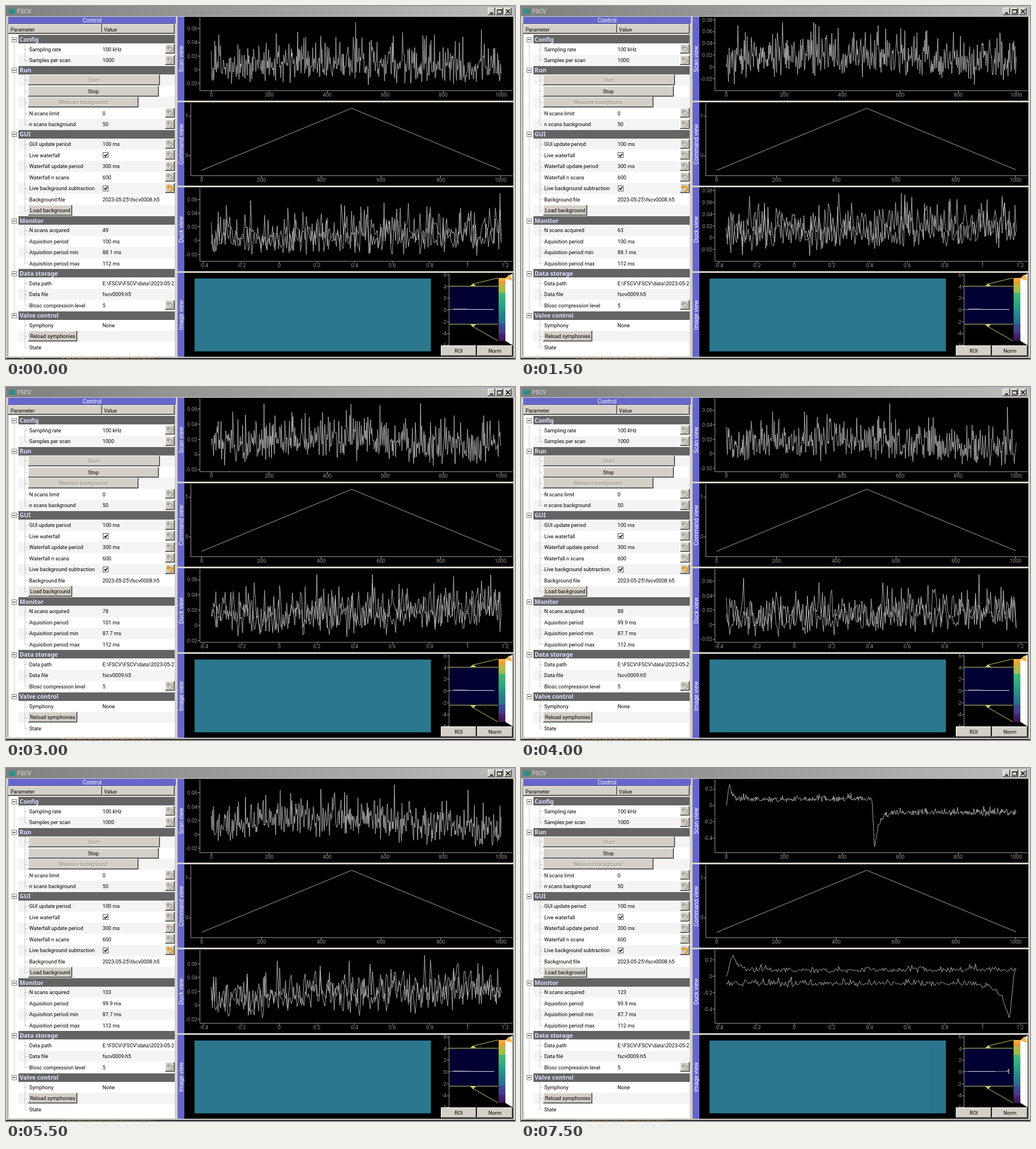
Animation of 899x623 px, one loop 8 s. Source, as an HTML page:

```html
<!DOCTYPE html>
<html lang="en">
<head>
<meta charset="utf-8">
<title>FSCV</title>
<style>
html, body { margin: 0; width: 100%; height: 100%; overflow: hidden; background: #d4d0c8; }
svg { display: block; width: 899px; height: 623px; }
text { font: 9.2px Roboto, "Liberation Sans", sans-serif; white-space: pre; }
.group { font: bold 10.5px "Noto Sans", "Open Sans", sans-serif; fill: #dcdcff; }
.dock { font-size: 10.4px; fill: #fff; text-anchor: middle; }
.axis { fill: #969696; }
.trace { fill: none; stroke: #c4c4c4; stroke-width: .85; stroke-linejoin: bevel; }
</style>
</head>
<body>
<svg id="stage" viewBox="0 0 899 623" xmlns="http://www.w3.org/2000/svg"></svg>
<script>
const FACE = '#d4d0c8', GREY = '#969696';
const STEP_MS = 500, STEPS = 16, KNOTS = 500;

// Low and high value of the scan shown in each step
const RANGES = [
  [-.0219, .069], [-.021, .0695], [-.024, .076], [-.0303, .0755],
  [-.025, .0735], [-.022, .076], [-.0149, .0672], [-.019, .071],
  [-.0164, .0695], [-.02, .071], [-.018, .0755], [-.0176, .0722],
  [-.019, .0715], [-.095, .0139], [-.52, .245], [-.505, .256]
];

const crisp = v => Math.floor(v) + .5;
const rect = (x, y, w, h, fill, extra = '') =>
  `<rect x="${x}" y="${y}" width="${w}" height="${h}" fill="${fill}" ${extra}/>`;
const path = (d, stroke, extra = '') =>
  `<path d="${d}" fill="none" stroke="${stroke}" ${extra}/>`;
const shape = (points, fill) => `<polygon points="${points}" fill="${fill}"/>`;
const text = (x, cy, s, extra = '') => `<text x="${x}" y="${cy + 3.3}" ${extra}>${s}</text>`;
const middle = 'text-anchor="middle"';

function bevel(x, y, w, h) {
  return rect(x, y, w, h, FACE)
    + path(`M${x + .5} ${y + h - 1}V${y + .5}H${x + w - 1}`, '#fff')
    + path(`M${x + 1} ${y + h - 1.5}H${x + w - 1.5}V${y + 1}`, '#808080')
    + path(`M${x} ${y + h - .5}H${x + w - .5}V${y}`, '#404040');
}

function button(x, y, w, h, label, disabled) {
  const cx = x + w / 2, cy = y + h / 2;
  return bevel(x, y, w, h)
    + (disabled ? text(cx + .8, cy + .8, label, middle + ' fill="#fff"') : '')
    + text(cx, cy, label, middle + (disabled ? ' fill="#848078"' : ''));
}

function titleBar() {
  const glyphs = [
    path('M855 12.5H860', '#000', 'stroke-width="2"'),
    path('M867.5 6.5H875.5V13H867.5ZM867 7H876', '#000'),
    path('M883 6L890 13M890 6L883 13', '#000', 'stroke-width="1.5"')
  ];
  return rect(0, 0, 899, 18, 'url(#title)')
    + rect(5, 5, 11, 9, '#2f8c86')
    + text(20, 10, 'FSCV', `fill="${FACE}" style="font-size:10px;font-weight:500"`)
    + [851, 865, 880].map((x, i) => bevel(x, 3, 13, 13) + glyphs[i]).join('');
}

// Rows: [centre y, label, value, revert icon]
const GROUPS = [
  [59, 'Config', [[76.5, 'Sampling rate', '100 kHz', 1], [96, 'Samples per scan', '1000', 1]]],
  [113.5, 'Run', [[130.5], [150], [170], [189.5, 'N scans limit', '0', 1], [209, 'n scans background', '50', 1]]],
  [226.5, 'GUI', [
    [244, 'GUI update period', '100 ms', 1], [263.5, 'Live waterfall', '', 1],
    [283, 'Waterfall update period', '300 ms', 1], [302.5, 'Waterfall n scans', '600', 1],
    [322, 'Live background subtraction', '', 2],
    [341.5, 'Background file', String.raw`2023-05-25\fscv0008.h5`], [361]]],
  [379, 'Monitor', [
    [396, 'N scans acquired', '<tspan id="count"/>'], [415.5, 'Aquisition period', '<tspan id="period"/>'],
    [435, 'Aquisition period min', '<tspan id="least"/>'], [454.5, 'Aquisition period max', '112 ms']]],
  [472, 'Data storage', [
    [489.5, 'Data path', String.raw`E:\FSCV\FSCV\data\2023-05-25`],
    [509, 'Data file', 'fscv0009.h5'], [528.5, 'Blosc compression level', '5', 1]]],
  [546.5, 'Valve control', [[563.5, 'Symphony', 'None'], [583], [602.5, 'State', '']]]
];

function revert(cy, kind) {
  const y = Math.floor(cy);
  const ink = kind === 2 ? '#e39a22' : '#aaa69e';
  return bevel(281, y - 9, 17, 17)
    + path(`M286 ${y - 3}H290.5Q294.5 ${y - 2.5} 294 ${y + 1}Q293 ${y + 4} 289 ${y + 4.5}`, ink, `stroke-width="${kind + 1}"`)
    + shape(`283,${y - 2.5} 288,${y - 7} 288,${y + 2}`, ink);
}

function checkbox(cy) {
  return rect(171.5, crisp(cy) - 5, 9, 9, '#fff', 'stroke="#555"')
    + path(`M173.5 ${cy - .5}L175.5 ${cy + 2}L179 ${cy - 2.5}`, '#000', 'stroke-width="1.7"');
}

function tree() {
  let out = rect(4, 50, 294, 568, '#fff'), index = 0;
  const dots = 'stroke-dasharray="1 1"';
  out += path('M14.5 59V546', '#999', dots);
  for (const [gy, name, rows] of GROUPS) {
    index++;
    out += rect(22, Math.floor(gy - 7.5), 276, 15, '#646464')
      + `<text class="group" x="24" y="${gy + 3.8}">${name}</text>`;
    for (const [cy, label, value, icon] of rows) {
      if (index++ % 2 === 0) out += rect(22, cy - 9.7, 276, 19.4, '#f4f4f4');
      out += path(`M33 ${crisp(cy)}H39`, '#999', dots);
      if (label) out += text(41, cy, label) + text(170.5, cy, value, 'clip-path="url(#tree)"');
      if (label && label.startsWith('Live')) out += checkbox(cy);
      if (icon) out += revert(cy, icon);
    }
    out += path(`M33.5 ${gy + 8}V${rows[rows.length - 1][0]}`, '#999', dots)
      + rect(10.5, crisp(gy) - 4, 8, 8, '#fff', 'stroke="#808080"')
      + path(`M12 ${crisp(gy)}H17`, '#000');
  }
  return out
    + button(39, 121, 233, 19, 'Start', true) + button(39, 141, 231, 19, 'Stop')
    + button(39, 160, 195, 19, 'Measure background', true)
    + button(39, 351, 78, 19, 'Load background') + button(39, 573, 87, 19, 'Reload symphonies');
}

function controlPanel() {
  return rect(4, 19, 296, 12, '#6666cc') + `<text class="dock" x="152" y="28.8">Control</text>`
    + bevel(4, 32, 166, 17) + bevel(170, 32, 128, 17)
    + path('M3.5 618V31.5H298', '#707070')
    + text(8, 41.5, 'Parameter') + text(173, 41.5, 'Value') + tree();
}

function dock(y, h, name) {
  return rect(303, y, 12, h, '#6666cc') + rect(315, y, 581, h, '#000')
    + `<text class="dock" transform="translate(313 ${y + h / 2 + .5}) rotate(-90)">${name}</text>`;
}

function xAxis(left, top, y, x0, dx, labels) {
  return path(`M${left} ${top}V${y}H895`, GREY)
    + labels.map((s, i) => {
      const x = x0 + i * dx;
      return path(`M${crisp(x)} ${y}v4`, GREY) + text(x, y + 7.3, s, middle + ' class="axis"');
    }).join('');
}

const yTick = (axisX, y, s) =>
  path(`M${axisX - 4} ${crisp(y)}h4`, GREY) + text(axisX - 4.5, y, s, 'text-anchor="end" class="axis"');

function plots() {
  const thousand = [0, 200, 400, 600, 800, 1000];
  return dock(19, 148, 'Scan view') + dock(170, 147, 'Command view') + dock(320, 148, 'Duck view')
    + xAxis(342.5, 20, 149.5, 362.5, 102.4, thousand)
    + xAxis(326.5, 171, 299.5, 345.5, 105.6, thousand)
    + xAxis(342.5, 321, 450.5, 349.5, 66.5, [-.4, -.2, 0, .2, .4, .6, .8, 1, 1.2])
    + yTick(326.5, 194, '1') + yTick(326.5, 264, '0')
    + '<path class="trace" d="M345.5 290L610.5 180.5L874 289"/>'
    + '<g id="ticks"/><path id="scan" class="trace"/><path id="duck" class="trace"/>';
}

function imageView() {
  const yellow = '#c8c864';
  return dock(471, 148, 'Image view')
    + rect(333, 481, 417.5, 128.5, '#2a778e')
    + `<g id="stripes">${[722, 728, 734, 741].map(x => rect(x, 481, 2, 128, '#123c60', 'opacity=".1"')).join('')}</g>`
    + rect(783, 494, 86, 68, '#000032')
    + path('M782.5 473V599', GREY)
    + [6, 4, 2, 0, -2, -4, -6].map((v, i) => yTick(782.5, 474.5 + i * 20.7, v)).join('')
    + path('M783 494.5H869M783 561.5H869M825 490.5L869 480M825 566L869 591', yellow)
    + shape('820,494 825,489.5 830,494', yellow) + shape('820,562 825,567 830,562', yellow)
    + path('M783 535.5H862', '#8f8f9c') + '<path id="histogram" fill="none" stroke="#e4e4ec"/>'
    + rect(870, 480, 12, 111, 'url(#colours)')
    + shape('882,480 895,472 895,599 882,591', '#fff')
    + shape('882,481 889,473.5 895,485', '#ffb044')
    + button(768, 599, 63, 19, 'ROI') + button(832, 599, 63, 19, 'Norm');
}

const stops = list => list.map(([o, c]) => `<stop offset="${o}" stop-color="${c}"/>`).join('');
const stage = document.getElementById('stage');
stage.innerHTML = `<defs>
  <linearGradient id="title">${stops([[0, '#808080'], [1, '#bcbcbc']])}</linearGradient>
  <linearGradient id="colours" x2="0" y2="1">${stops([
    [0, '#ffb450'], [.06, '#eea030'], [.1, '#e09c34'], [.1, '#b4b84c'], [.23, '#a0bc4c'],
    [.23, '#48b878'], [.42, '#2aa683'], [.58, '#2a828c'], [.73, '#2c6c8e'],
    [.73, '#3c4c98'], [.87, '#423c84'], [.88, '#482870'], [1, '#3c1456']])}</linearGradient>
  <clipPath id="tree"><rect x="4" y="50" width="294" height="568"/></clipPath>
</defs>`
  + rect(0, 0, 899, 623, FACE) + titleBar() + controlPanel() + plots() + imageView()
  + rect(0, 621, 899, 2, '#303030')
  + path('M27 622H32M98 622H260', '#9c7034', 'stroke-dasharray="5 3 9 2"');

function randomFrom(seed) {
  return () => {
    seed = (seed + 0x6D2B79F5) | 0;
    let r = Math.imul(seed ^ (seed >>> 15), 1 | seed);
    r = (r + Math.imul(r ^ (r >>> 7), 61 | r)) ^ r;
    return ((r ^ (r >>> 14)) >>> 0) / 4294967296;
  };
}

function pulse(u) {
  if (u < .503) return (.11 + .15 * Math.exp(-Math.max(0, u - .013) / .009)) * Math.min(1, .1 + u / .011);
  if (u < .511) return .11 - (u - .503) / .008 * .61;
  return -.055 - .45 * Math.exp(-(u - .511) / .016);
}

function signal(u, step, noise) {
  if (step >= 14) return pulse(u) + noise * .02 * (1 + Math.exp(-(((u - .91) / .035) ** 2)));
  if (step === 13) return noise + (u < .49 ? 1 : 0);
  return noise + (.4 + step * .07) * Math.exp(-(((u - .38) / .33) ** 2));
}

function makeScan(step) {
  const random = randomFrom(711 + step * 97);
  const raw = Array.from({ length: KNOTS + 1 }, (_, i) => {
    const noise = (random() + random() + random() + random() - 2) * 1.73;
    return signal(i / KNOTS, step, noise + .1 * noise * noise);
  });
  const low = Math.min(...raw), high = Math.max(...raw);
  return raw.map(v => (v - low) / (high - low));
}

const TOP = 29, SPAN = 110, DUCK_DY = 301.5;
const trace = (scan, xAt, dy) => 'M' + scan.map((v, i) =>
  `${xAt(i / KNOTS).toFixed(1)} ${(TOP + SPAN * (1 - v) + dy).toFixed(1)}`).join('L');

function tickMarks([low, high]) {
  const unit = high - low > .2 ? .2 : .02;
  let out = '';
  for (let k = -6; k <= 6; k++) {
    const y = TOP + SPAN * (high - k * unit) / (high - low);
    if (y < 22 || y > 147) continue;
    const label = String(+(k * unit).toFixed(2));
    out += yTick(342.5, y, label) + yTick(342.5, y + DUCK_DY, label);
  }
  return out;
}

const periodAt = s =>
  s === 5 || s === 6 ? '101' : (s >= 8 && s <= 11) || s === 15 ? '99.9' : '100';

const scenes = RANGES.map((range, step) => {
  const scan = makeScan(step);
  return {
    ticks: tickMarks(range),
    scan: trace(scan, u => 362.5 + 512 * u, 0),
    duck: trace(scan, u => 362.5 + 512 * (1 - Math.abs(2 * u - 1)), DUCK_DY),
    count: step < 2 ? 49 + step * 5 : 48 + step * 5,
    period: periodAt(step) + ' ms',
    least: (step < 5 ? '88.1' : '87.7') + ' ms',
    spike: step >= 14
  };
});

const part = id => document.getElementById(id);
let shown = -1;

function render(ms) {
  const step = Math.floor(ms / STEP_MS) % STEPS;
  if (step === shown) return;
  shown = step;
  const scene = scenes[step];
  part('ticks').innerHTML = scene.ticks;
  part('scan').setAttribute('d', scene.scan);
  part('duck').setAttribute('d', scene.duck);
  for (const id of ['count', 'period', 'least']) part(id).textContent = scene[id];
  part('stripes').setAttribute('visibility', scene.spike ? 'visible' : 'hidden');
  part('histogram').setAttribute('d', scene.spike
    ? 'M790 535.5H838M858 535.5L861.5 531.5V540'
    : 'M790 535H810L820 535.5H862');
}

function loop() {
  render(performance.now());
  requestAnimationFrame(loop);
}
loop();
</script>
</body>
</html>
```
